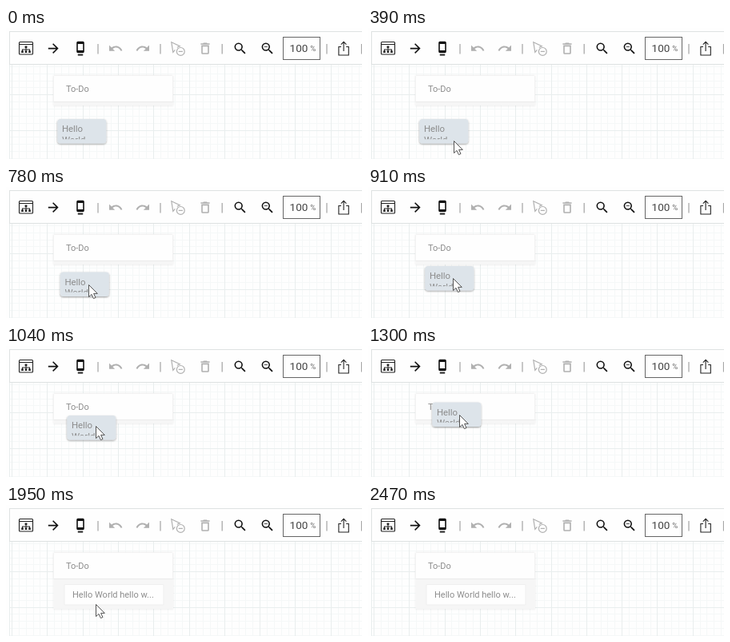
Animation, 445 px wide and 164 px high, one loop 2.99 s. Source, as an HTML page:

```html
<!DOCTYPE html>
<html lang="en">
<head>
<meta charset="utf-8">
<title>Drag a note into a list</title>
<style>
  html, body { margin: 0; width: 100%; height: 100%; overflow: hidden; background: #fefefe; }
  svg { display: block; width: 445px; height: 164px; }
  text { font-family: Roboto, "Noto Sans", sans-serif; fill: #8c8c8c; }
  .muted { fill: #b0b0b0; }
  .line { fill: none; stroke: #222; stroke-width: 1.1; }
</style>
</head>
<body>
<svg viewBox="0 0 445 164">
  <defs>
    <filter id="shadow" x="-10%" y="-15%" width="120%" height="140%">
      <feDropShadow dx="0" dy="1" stdDeviation=".8" flood-color="#000" flood-opacity=".4"/>
    </filter>
    <filter id="soft" x="-5%" y="-10%" width="110%" height="125%">
      <feDropShadow dx="0" dy=".5" stdDeviation=".8" flood-color="#000" flood-opacity=".08"/>
    </filter>
    <clipPath id="cardClip"><rect width="61" height="25.2"/></clipPath>
  </defs>

  <g id="grid" fill="none"></g>

  <rect x="4.5" y="4.5" width="445" height="41" fill="#fefefe" stroke="#dee2e2"/>
  <g class="line">
    <rect x="16.5" y="17.5" width="17" height="15.5" rx="1"/>
    <path d="M16.5 20.5H33.5M25 24.5V27M20.5 29V27H29.5V29M25 27V29"/>
  </g>
  <path d="M23.6 22.5h2.8v2.5h-2.8zM19.2 28.4h2.6v2.5h-2.6zM23.7 28.4h2.6v2.5h-2.6zM28.2 28.4h2.6v2.5h-2.6z" fill="#222"/>
  <g id="icons" fill="#111"></g>
  <path class="line" d="M419 23.5H415.9V34H428.3V23.5H425.2M422.1 29V17.4M418.8 20.6L422.1 17.3L425.4 20.6"/>
  <g fill="none" stroke="#b0b0b0" stroke-width="1.2">
    <path d="M211.4 27.4L208.8 30.4L206.8 17.8L217.2 22.8L213.8 24.2"/>
    <circle cx="218.3" cy="29.4" r="4.9"/>
    <path d="M215.7 29.4H220.9"/>
  </g>
  <path id="separators" stroke="#aaa" stroke-width="1.3"/>
  <rect x="346.5" y="11.5" width="46" height="28" fill="#fefefe" stroke="#666"/>
  <text x="354.6" y="30.3" font-size="13.5" style="fill:#444">100</text>
  <text x="380.3" y="29.3" font-size="9.6" style="fill:#666">%</text>

  <g filter="url(#soft)">
    <rect id="listBody" x="59.5" y="92" width="149.5" height="5" fill="#f6f6f6"/>
    <rect x="59.5" y="59.5" width="149" height="33" rx="1" fill="#fefefe" stroke="#f2f2f2"/>
  </g>
  <path d="M59.5 92.5H209" stroke="#ebebeb"/>
  <text x="75" y="80" font-size="11">To-Do</text>

  <g id="item">
    <rect x="73" y="99.5" width="124" height="25.5" rx="1" fill="#fefefe" stroke="#efefef"/>
    <text x="83" y="115.5" font-size="11">Hello World hello w...</text>
  </g>

  <g id="card">
    <rect width="61" height="30.5" rx="4" fill="#dde4ea" filter="url(#shadow)"/>
    <g clip-path="url(#cardClip)" font-size="11.4">
      <text x="5.6" y="16.2">Hello</text>
      <text x="5.6" y="29.6">World</text>
    </g>
  </g>

  <path id="cursor" d="M.5 .5V15.6L4 12.4L6.4 17.6L9 16.5L6.6 11.4H11.3Z"
        fill="#fff" stroke="#555" stroke-width="1" stroke-linejoin="round"/>
</svg>

<script>
const $ = id => document.getElementById(id);
const add = (parent, attrs) => {
  const el = document.createElementNS("http://www.w3.org/2000/svg", "path");
  for (const key in attrs) el.setAttribute(key, attrs[key]);
  parent.append(el);
};

// Canvas grid: every fifth line is stronger.
const CELL = 8.86;
function gridLines(major) {
  let d = "";
  for (let i = 0; i < 50; i++) {
    if ((i % 5 === 0) !== major) continue;
    const x = Math.round(7 + i * CELL) + .5;
    const y = Math.round(39 + i * CELL) + .5;
    d += `M${x} 46V164`;
    if (y > 46 && y < 164) d += `M4 ${y}H445`;
  }
  return d;
}
add($("grid"), { d: gridLines(false), stroke: "#f5f8f8" });
add($("grid"), { d: gridLines(true) + "M4.5 46V164", stroke: "#e9eeee" });

$("separators").setAttribute("d", [115, 193, 270.2, 401, 444.5].map(x => `M${x} 20V32.5`).join(""));

// Toolbar icons on a 24-unit square, placed by centre.
const lens = "M15.5 14h-.79l-.28-.27A6.47 6.47 0 0 0 16 9.5 6.5 6.5 0 1 0 9.5 16c1.61 0 3.09-.59 4.23-1.57l.27.28v.79l5 4.99L20.49 19zM9.5 14a4.5 4.5 0 1 1 0-9 4.5 4.5 0 0 1 0 9z";
const icons = [
  [59.2, "M12 4l-1.41 1.41L16.17 11H4v2h12.17l-5.58 5.59L12 20l8-8z"],
  [93, "M8 23h8v-2H8zM16 1H8a2 2 0 0 0-2 2v14a2 2 0 0 0 2 2h8a2 2 0 0 0 2-2V3a2 2 0 0 0-2-2zM16 15H8V5h8z"],
  [137, "M12.5 8c-2.65 0-5.05.99-6.9 2.6L2 7v9h9l-3.62-3.62c1.39-1.16 3.16-1.88 5.12-1.88 3.54 0 6.55 2.31 7.6 5.5l2.37-.78C21.08 11.03 17.15 8 12.5 8z", true],
  [171, "M18.4 10.6C16.55 8.99 14.15 8 11.5 8c-4.65 0-8.58 3.03-9.97 7.22L3.9 16c1.05-3.19 4.05-5.5 7.6-5.5 1.95 0 3.73.72 5.12 1.88L13 16h9V7z", true],
  [249, "M6 19a2 2 0 0 0 2 2h8a2 2 0 0 0 2-2V7H6zM8 9h8v10H8zM15.5 4l-1-1h-5l-1 1H5v2h14V4z", true],
  [292.7, lens],
  [326.8, lens + "M7 9h5v1H7z"]
];
for (const [x, d, muted] of icons) {
  add($("icons"), {
    d, class: muted ? "muted" : "", "fill-rule": "evenodd",
    transform: `translate(${x} 25.6) scale(.8) translate(-12 -12)`
  });
}

// Motion is sampled in whole ticks, so each pose holds.
const TICK = 130, TICKS = 23, DROP = 12;
const cursorPath = [
  [1, 118, 158], [3, 107, 141], [5, 100, 130], [7, 106, 114], [8, 112, 100],
  [10, 114, 86], [13, 114, 86], [14, 113, 105], [15, 112, 124], [18, 122, 152]
];
const cardPath = [[5, 64.3, 114], [7, 71.3, 99], [8, 76.3, 87], [10, 80.3, 70.5]];

function along(path, tick) {
  if (tick <= path[0][0]) return path[0].slice(1);
  for (let i = 1; i < path.length; i++) {
    const [t0, x0, y0] = path[i - 1], [t1, x1, y1] = path[i];
    if (tick <= t1) {
      const p = (tick - t0) / (t1 - t0);
      return [x0 + (x1 - x0) * p, y0 + (y1 - y0) * p];
    }
  }
  return path.at(-1).slice(1);
}

function place(el, path, tick, visible) {
  el.setAttribute("transform", `translate(${along(path, tick).join(" ")})`);
  el.style.display = visible ? "" : "none";
}

function render(ms) {
  const tick = Math.floor(ms / TICK) % TICKS;
  const dropped = tick >= DROP;
  // The pointer rests one tick after the drop before it leaves.
  place($("cursor"), cursorPath, tick, tick >= 1 && tick <= 18);
  place($("card"), cardPath, tick, !dropped);
  $("item").style.display = dropped ? "" : "none";
  $("listBody").setAttribute("height", dropped ? 38 : 5);
}

const start = performance.now();
function loop() {
  render(performance.now() - start);
  requestAnimationFrame(loop);
}
render(0);
requestAnimationFrame(loop);
</script>
</body>
</html>
```
